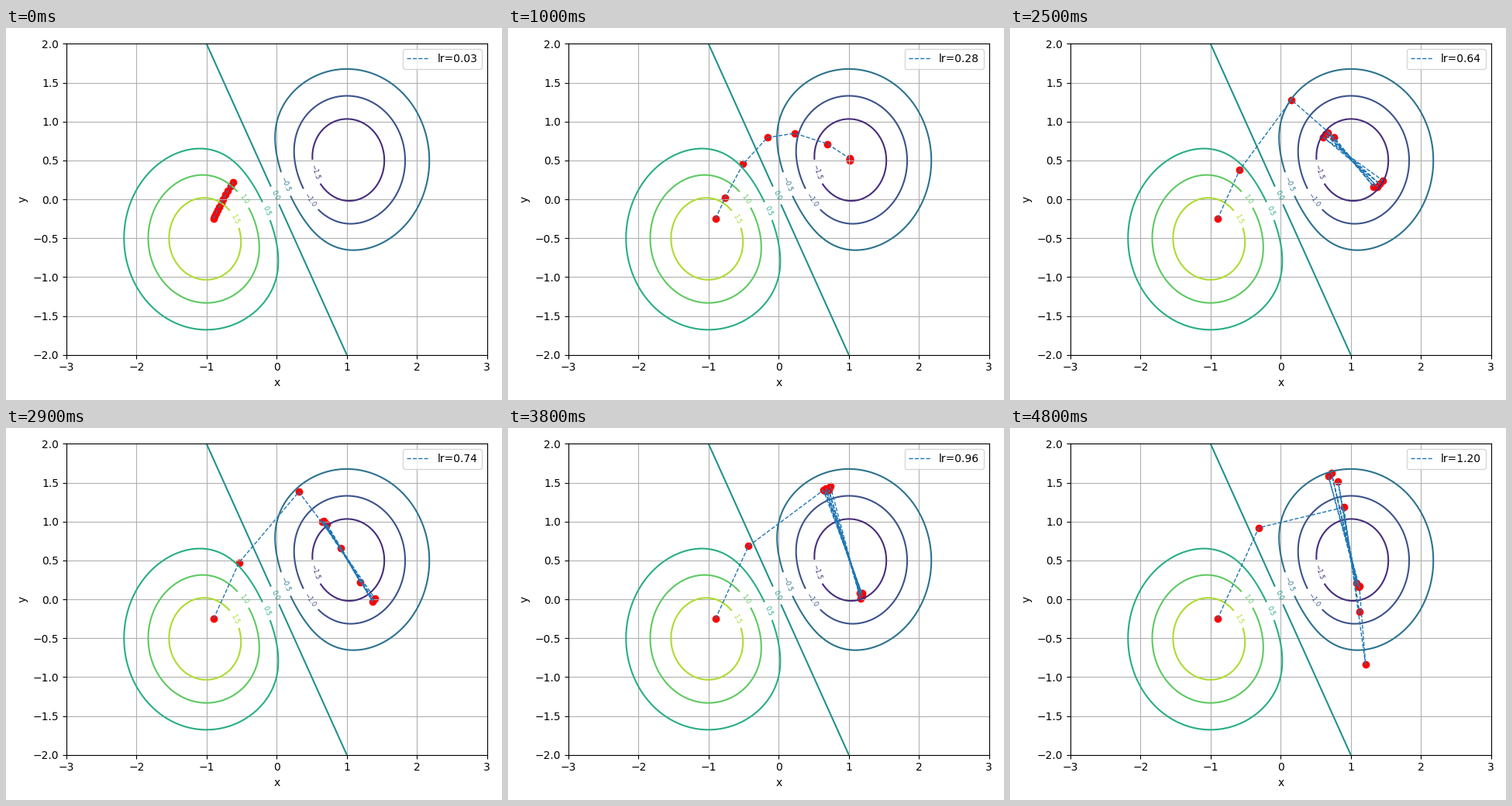
Write a matplotlib script that moves like this. It is 640 by 480 pixels and loops after 4900 ms.

```python
import numpy as np
import matplotlib.pyplot as plt
from matplotlib.animation import FuncAnimation

FRAMES = 49
STEPS = 10
START = np.array([-0.9, -0.25])
PEAK = np.array([-1.0, -0.5])
PIT = np.array([1.0, 0.5])
RATES = np.linspace(0.01, 1.2, FRAMES + 1)[1:]


def bump(p, center):
    return np.exp(-np.sum((p - center) ** 2, axis=-1))


def height(p):
    return 2 * (bump(p, PEAK) - bump(p, PIT))


def gradient(p):
    return -4 * ((p - PEAK) * bump(p, PEAK) - (p - PIT) * bump(p, PIT))


def descend(rate):
    path = [START]
    for _ in range(STEPS):
        path.append(path[-1] - rate * gradient(path[-1]))
    return np.array(path)


fig, ax = plt.subplots(figsize=(6.4, 4.8), dpi=100)
X, Y = np.meshgrid(np.linspace(-3, 3, 241), np.linspace(-2, 2, 161))
levels = ax.contour(X, Y, height(np.stack([X, Y], axis=-1)))
ax.clabel(levels, inline=True, fontsize=6)

path = descend(RATES[0])
dots = ax.scatter(*path.T, color="red")
trail, = ax.plot(*path.T, "--", lw=1, label=f"lr={RATES[0]:.2f}")
legend = ax.legend(loc="upper right")
ax.set(xlim=(-3, 3), ylim=(-2, 2), xlabel="x", ylabel="y")
ax.grid()
fig.tight_layout()


def update(i):
    path = descend(RATES[i])
    dots.set_offsets(path)
    trail.set_data(*path.T)
    legend.get_texts()[0].set_text(f"lr={RATES[i]:.2f}")
    return dots, trail, legend


anim = FuncAnimation(fig, update, frames=FRAMES, interval=100,
                     repeat=True, repeat_delay=0)
plt.show()
```
